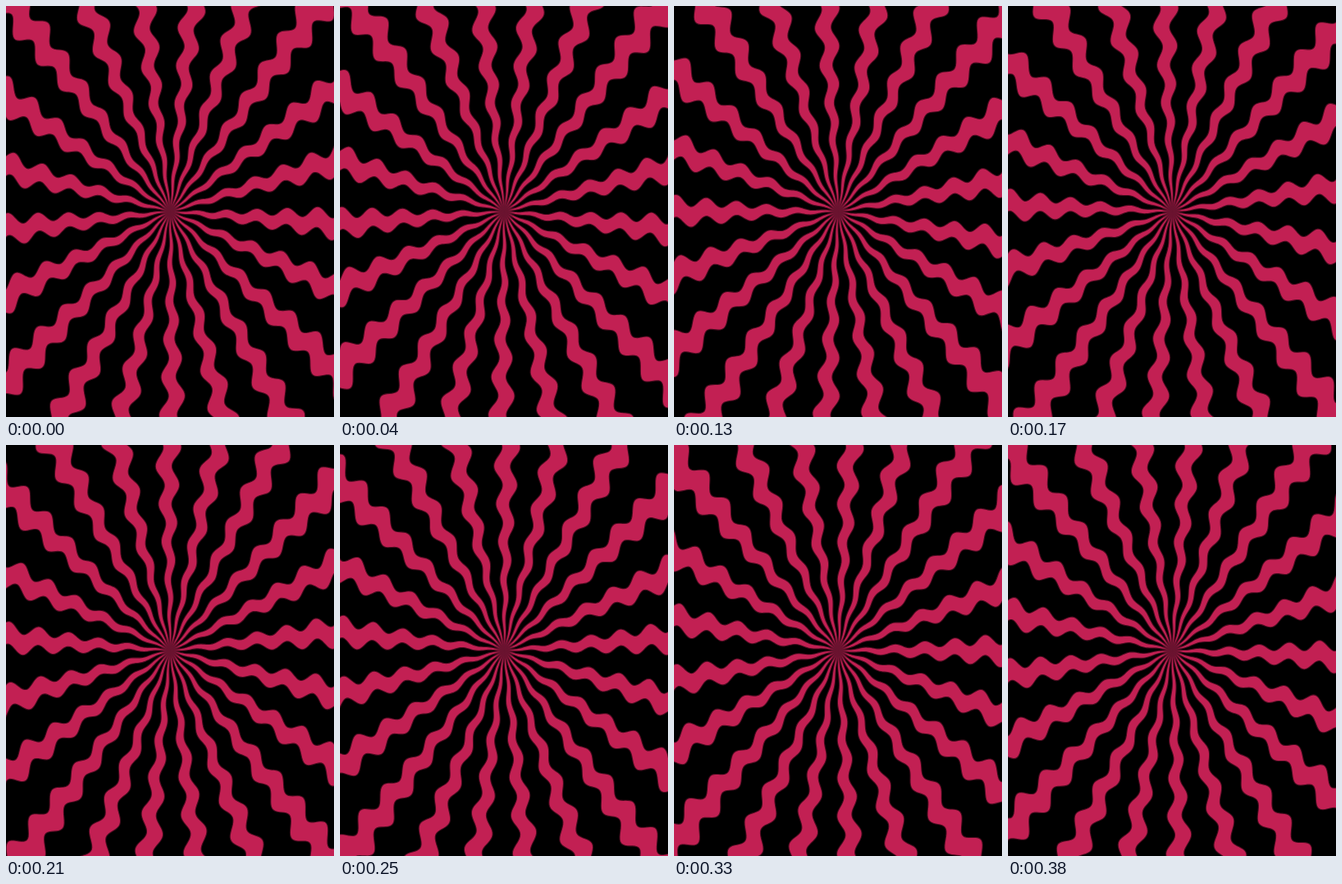
Recreate the animation shown at these times as an HTML page with a canvas. Size 400x500 px, loop 0.43 s.

```html
<!DOCTYPE html>
<html lang="en">
<head>
<meta charset="utf-8">
<title>Wavy sunburst</title>
<style>
  html, body { margin: 0; width: 100%; height: 100%; overflow: hidden; background: #000; }
  canvas { display: block; }
</style>
</head>
<body>
<canvas id="stage" width="400" height="500"></canvas>
<script>
const ctx = document.getElementById('stage').getContext('2d');
const LOOP = 430;
const STEP_TIMES = [0, 40, 80, 130, 170, 210, 250, 290, 330, 380];
const RAYS = 21;
const SPACING = 2 * Math.PI / RAYS;
const HALF_WIDTH = SPACING * 0.178;
const STRETCH = 1.25;
const REACH = 320;
const DEG = Math.PI / 180;

// Angular offset of the ripple at a given radius, the same for every ray.
const ripple = r => (-0.9 + 1.65 * Math.cos(2 * Math.PI * (r - 161) / 37)) * DEG;

// Angles run clockwise from straight down.
function addPoint(path, r, angle) {
  const a = angle + ripple(r);
  path.lineTo(-r * Math.sin(a), STRETCH * r * Math.cos(a));
}

function rayPath(angle) {
  const path = new Path2D();
  for (let r = 0; r <= REACH; r += 2) addPoint(path, r, angle - HALF_WIDTH);
  for (let r = REACH; r >= 0; r -= 2) addPoint(path, r, angle + HALF_WIDTH);
  path.closePath();
  return path;
}

function drawHub() {
  ctx.save();
  ctx.scale(1, STRETCH);
  const glow = ctx.createRadialGradient(0, 0, 0, 0, 0, 13);
  glow.addColorStop(0, 'rgba(104, 18, 46, 1)');
  glow.addColorStop(0.4, 'rgba(104, 18, 46, 0.9)');
  glow.addColorStop(1, 'rgba(104, 18, 46, 0)');
  ctx.fillStyle = glow;
  ctx.fillRect(-13, -13, 26, 26);
  ctx.restore();
}

function draw(step) {
  ctx.setTransform(1, 0, 0, 1, 0, 0);
  ctx.fillStyle = '#000';
  ctx.fillRect(0, 0, 400, 500);
  ctx.translate(200.3, 250);
  ctx.fillStyle = '#c22053';
  ctx.strokeStyle = 'rgba(194, 32, 83, 0.35)';
  ctx.lineWidth = 2.2;
  for (let i = 0; i < RAYS; i++) {
    const ray = rayPath((i + step / STEP_TIMES.length) * SPACING);
    ctx.stroke(ray);
    ctx.fill(ray);
  }
  drawHub();
}

function tick() {
  const t = performance.now() % LOOP;
  draw(STEP_TIMES.filter(start => start <= t).length - 1);
  requestAnimationFrame(tick);
}
tick();
</script>
</body>
</html>
```
